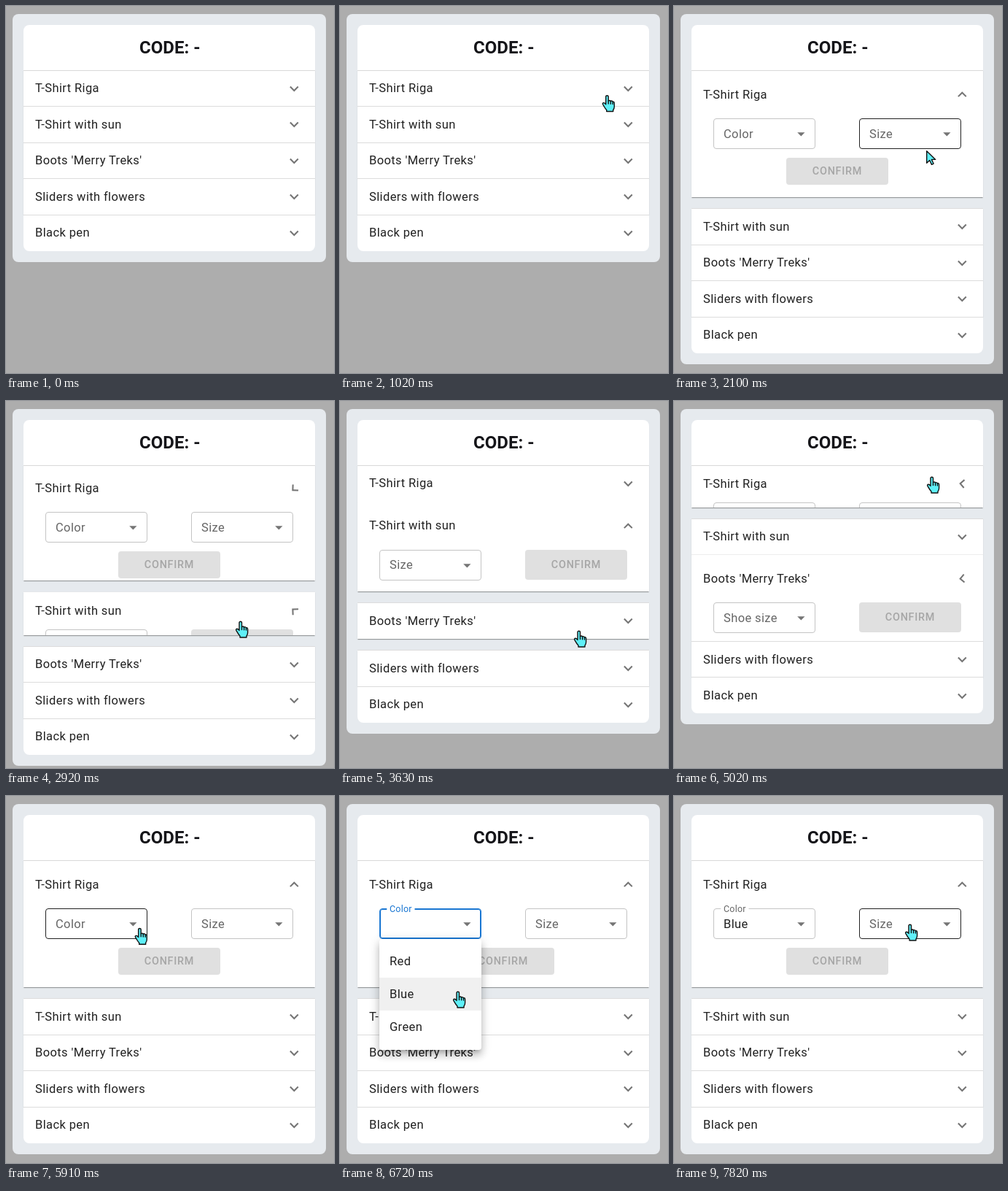
An HTML page that plays this animation: 450x503 px, repeating every 8 s.

```html
<!DOCTYPE html>
<html lang="en">
<head>
<meta charset="utf-8">
<title>Order code</title>
<style>
  html, body { margin: 0; width: 100%; height: 100%; overflow: hidden; background: #adadad; }
  body { position: relative; font: 16.5px/24px Roboto, sans-serif; letter-spacing: .38px; color: #212121; }
  div, svg { position: absolute; box-sizing: border-box; }
  #card { left: 9px; top: 11px; width: 430px; background: #e6eaee; border-radius: 8px; }
  #title { left: 24px; top: 26px; width: 400px; height: 63px; padding-left: 1.5px; background: #fff;
    border-radius: 8px 8px 0 0; border-bottom: 1px solid #d9d9d9; font-weight: 700; font-size: 24px;
    line-height: 62px; letter-spacing: 0; text-align: center; color: #151519; z-index: 1; }
  .panel { left: 24px; width: 400px; background: #fff;
    box-shadow: 0 2px 1px -1px rgba(0,0,0,.22), 0 1px 1px rgba(0,0,0,.16); }
  .panel.last { border-radius: 0 0 8px 8px; box-shadow: none; }
  .line { left: 0; top: -.4px; width: 100%; height: 1px; background: #dcdcdc; }
  .body { inset: 0; overflow: hidden; }
  .head { left: 16px; top: .5px; white-space: nowrap; display: flex; align-items: center; }
  .chevron { left: 359.2px; width: 24.7px; height: 24.7px; fill: #757575; }
  .content { left: 0; width: 100%; }
  .select { top: .3px; width: 140px; height: 42px; border: 1px solid #c4c4c4; border-radius: 4px; }
  .select.hover { border-color: #212121; }
  .select.focus { border-color: #1976d2; box-shadow: inset 0 0 0 1px #1976d2; }
  .label, .value { left: 13px; top: 8.6px; white-space: nowrap; }
  .label { color: #666; transform-origin: 0 50%; }
  .label.raised { top: 12.6px; line-height: 16px; background: #fff; box-shadow: -5px 0 #fff, 5px 0 #fff; }
  .focus .label { color: #1976d2; }
  .arrow { right: 6px; top: 7.8px; width: 24.7px; height: 24.7px; fill: #757575; }
  .confirm { width: 140px; background: #e0e0e0; border-radius: 4px; color: #a6a6a6; text-align: center;
    font-size: 14.4px; font-weight: 500; letter-spacing: .75px; }
  #menu { left: 54px; top: 196px; width: 140px; height: 152px; background: #fff; border-radius: 4px; z-index: 2;
    transform-origin: 50% 0;
    box-shadow: 0 5px 5px -3px rgba(0,0,0,.2), 0 8px 10px 1px rgba(0,0,0,.14), 0 3px 14px 2px rgba(0,0,0,.12); }
  .item { left: 0; width: 100%; height: 45px; line-height: 45px; padding-left: 14px; }
  #cursor { left: 0; top: 0; width: 26px; height: 28px; overflow: visible; z-index: 3;
    fill: #5ff0f8; stroke: #111; stroke-width: 1.4; stroke-linejoin: round; stroke-linecap: round; }
</style>
</head>
<body>
<div id="card"></div>
<div id="title">CODE: -</div>
<div id="menu"></div>
<svg id="cursor">
  <path id="pointer" d="M0 0V16.5L4 12.8L6.8 18.6L9.4 17.3L6.7 11.7H12Z"/>
  <g id="hand">
    <path d="M-2 11.5V1.8Q-2 .3 -.3 .3Q1.5 .3 1.5 1.8V7.5Q3.5 6.3 4.6 8Q6.5 7 7.5 8.8Q9.6 8.3 9.6 10.8V15.5Q9.6 18 8 20V22H-1V20Q-3 18 -4.2 15.6L-6.2 12.3Q-6.8 10.6 -5.3 10.2Q-3.8 10 -2 12.4Z"/>
    <path d="M1.5 7.5V11.5M4.6 8V11.8M7.5 8.8V12" fill="none"/>
  </g>
</svg>
<script>
const LOOP = 8000, TOP = 88, CLOSED = 49.5, OPEN = 66, GAP = 15.5, LAG = 62;
const MENU_OPEN = 6150, MENU_CLOSE = 7040;
const $ = id => document.getElementById(id);

function add(parent, className, text = '', style = {}) {
  const el = document.createElement('div');
  el.className = className;
  el.textContent = text;
  Object.assign(el.style, style);
  return parent.appendChild(el);
}

function addIcon(parent, className, d) {
  parent.insertAdjacentHTML('beforeend', `<svg class="${className}" viewBox="0 0 24 24"><path d="${d}"/></svg>`);
  return parent.lastElementChild;
}

function addSelect(parent, name, left) {
  const box = add(parent, 'select', '', { left: left + 'px' });
  const label = add(box, 'label', name);
  const value = add(box, 'value');
  addIcon(box, 'arrow', 'M7 10l5 5 5-5z');
  return { box, label, value };
}

function addConfirm(parent, left, top, height) {
  add(parent, 'confirm', 'CONFIRM', { left: left + 'px', top: top + 'px', height: height + 'px', lineHeight: height + 'px' });
}

function addPanel(name, fields) {
  const el = add(document.body, 'panel');
  const body = add(el, 'body');
  const head = add(body, 'head', name);
  const chevron = addIcon(body, 'chevron', 'M16.59 8.59L12 13.17 7.41 8.59 6 10l6 6 6-6z');
  const size = fields.length === 2 ? 108 : 57.5;
  const content = add(body, 'content', '', { height: size + 'px' });
  const selects = fields.map((field, i) => addSelect(content, field, 30 + 200 * i));
  if (fields.length === 2) addConfirm(content, 130, 54, 37);
  if (fields.length === 1) addConfirm(content, 230, .3, 41);
  return { el, size, head, chevron, content, selects, line: add(el, 'line') };
}

const panels = [
  addPanel('T-Shirt Riga', ['Color', 'Size']),
  addPanel('T-Shirt with sun', ['Size']),
  addPanel("Boots 'Merry Treks'", ['Shoe size']),
  addPanel('Sliders with flowers', []),
  addPanel('Black pen', [])
];
panels.at(-1).el.classList.add('last');
const [color, size] = panels[0].selects;
const items = ['Red', 'Blue', 'Green'].map((name, i) => add($('menu'), 'item', name, { top: 8 + 45 * i + 'px' }));

const clicks = [
  { at: -1000, panel: -1 }, { at: 1530, panel: 0 }, { at: 2800, panel: 1 },
  { at: 3600, panel: 2 }, { at: 4914, panel: 0 }
];

const home = { x: 432, y: 520 };
const moves = [
  { from: 130, to: 1080, x: 366, y: 118 },
  { from: 1860, to: 2385, x: 322, y: 302 },
  { from: 3180, to: 3460, x: 328, y: 315 },
  { from: 4130, to: 4900, x: 354, y: 104 },
  { from: 5650, to: 5980, x: 162, y: 191 },
  { from: 6400, to: 6720, x: 162, y: 268 },
  { from: 7200, to: 7810, x: 324, y: 176 }
];

const clamp = x => Math.min(1, Math.max(0, x));
const mix = (a, b, k) => a + (b - a) * k;
const smooth = s => s * s * (3 - 2 * s);

// cubic-bezier(.4, 0, .2, 1)
function ease(x) {
  if (x <= 0 || x >= 1) return clamp(x);
  let low = 0, high = 1, s;
  for (let i = 0; i < 20; i++) {
    s = (low + high) / 2;
    if (1.2 * s * (1 - s) ** 2 + .6 * s * s * (1 - s) + s ** 3 < x) low = s; else high = s;
  }
  return smooth(s);
}

const ramp = (t, start, length) => ease((t - start) / length);

function cursorAt(t) {
  return moves.reduce((p, m) => {
    const k = smooth(clamp((t - m.from) / (m.to - m.from)));
    return { x: mix(p.x, m.x, k), y: mix(p.y, m.y, k) };
  }, home);
}

function layoutPanels(t, y) {
  const step = clicks.findLastIndex(c => c.at <= t);
  const { at, panel: active } = clicks[step];
  const previous = step ? clicks[step - 1].panel : -1;
  const share = (i, k) => i === active ? k : i === previous ? 1 - k : 0;
  const grow = ramp(t, at + LAG, 300), turn = ramp(t, at + LAG, 125);
  let top = TOP, overHead = false;
  panels.forEach((p, i) => {
    if (i && active >= 0 && (i === active || i === active + 1)) top += GAP;
    const k = share(i, grow), spin = share(i, turn);
    const head = mix(CLOSED, OPEN, k), height = head + p.size * k;
    p.el.style.top = top + 'px';
    p.el.style.height = height + 'px';
    p.head.style.height = head + 'px';
    p.chevron.style.top = head / 2 - 12 + 'px';
    p.chevron.style.transform = `rotate(${180 * spin}deg)`;
    p.content.style.top = head + 'px';
    p.content.style.visibility = k ? 'visible' : 'hidden';
    p.line.style.opacity = 1 - spin;
    overHead ||= y >= top && y < top + head;
    top += height;
  });
  $('card').style.height = top + 4 + 'px';
  return { overHead, ready: active === 0 && grow > .5 };
}

function drawSelects(t, { x, y }, ready) {
  const focused = t >= MENU_OPEN && t < MENU_CLOSE + 60;
  const hovered = left => ready && !focused && y >= 154 && y < 199 && x >= left && x < left + 140;
  const shrink = ramp(t, MENU_OPEN, 200);
  color.box.classList.toggle('focus', focused);
  color.box.classList.toggle('hover', hovered(54));
  size.box.classList.toggle('hover', hovered(254));
  color.label.classList.toggle('raised', shrink > .5);
  color.label.style.transform = `translateY(${-20.5 * shrink}px) scale(${1 - .25 * shrink})`;
  color.value.textContent = t >= MENU_CLOSE ? 'Blue' : '';
}

function drawMenu(t) {
  const show = ramp(t, MENU_OPEN, 250), hide = ramp(t, MENU_CLOSE, 200);
  const blue = ramp(t, 6640, 80);
  $('menu').style.opacity = show * (1 - hide);
  $('menu').style.transform = `scale(${mix(.75, 1, show)}, ${mix(.56, 1, show)})`;
  items[0].style.background = `rgba(0,0,0,${.08 * (1 - blue)})`;
  items[1].style.background = `rgba(0,0,0,${.06 * blue})`;
}

function drawCursor(t, { x, y }, overHead, ready) {
  const overSelect = ready && y >= 154 && y < 197 && (x < 194 || x >= 254);
  const overMenu = t >= MENU_OPEN && t < MENU_CLOSE + 200;
  const hand = x < 424 && (overHead || overSelect || overMenu);
  $('cursor').style.transform = `translate(${x}px, ${y}px)`;
  $('hand').style.display = hand ? '' : 'none';
  $('pointer').style.display = hand ? 'none' : '';
}

function draw(t) {
  const tip = cursorAt(t);
  const { overHead, ready } = layoutPanels(t, tip.y);
  drawSelects(t, tip, ready);
  drawMenu(t);
  drawCursor(t, tip, overHead, ready);
}

const begin = performance.now();
function tick() {
  draw((performance.now() - begin) % LOOP);
  requestAnimationFrame(tick);
}
tick();
</script>
</body>
</html>
```
